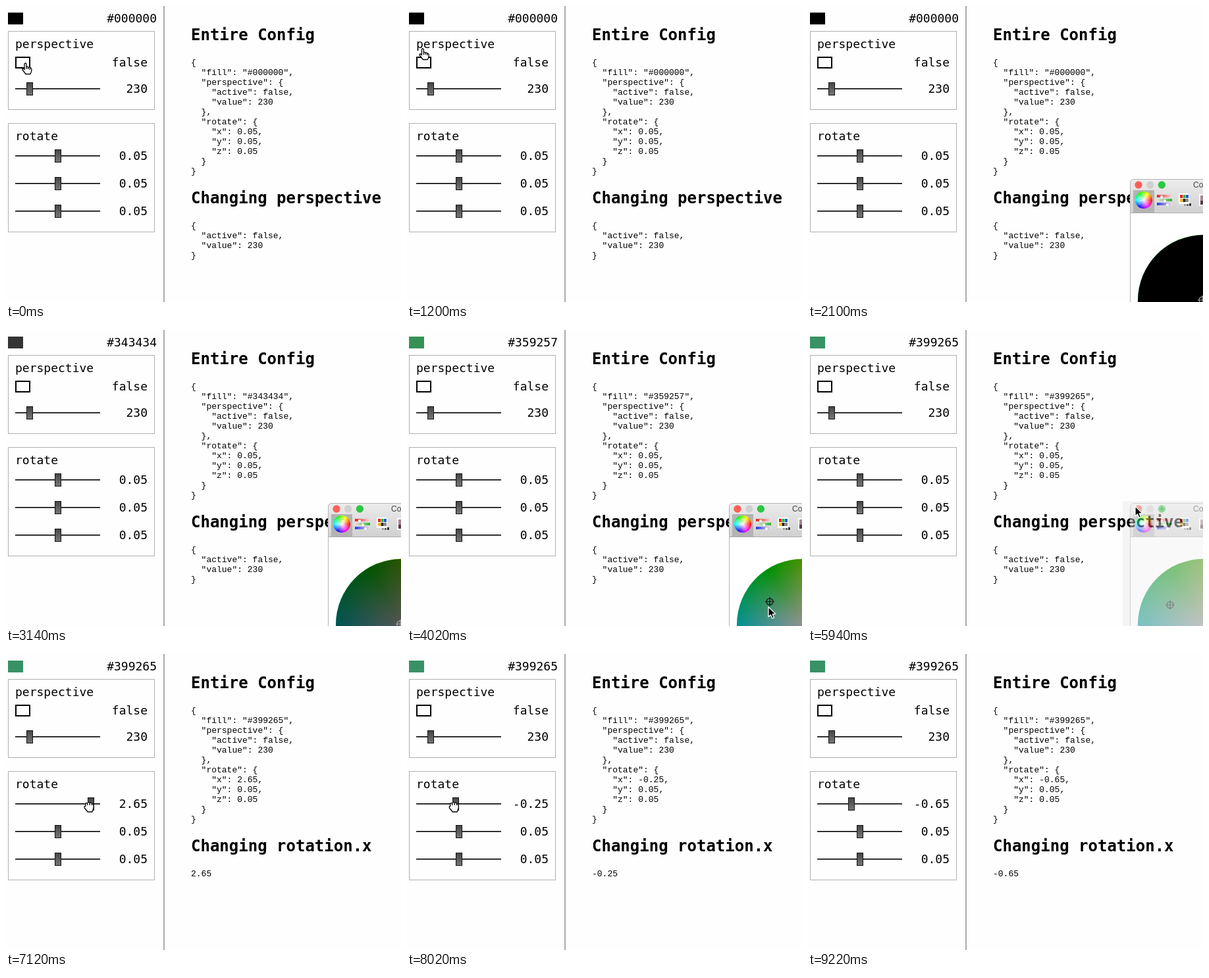
An HTML page with a canvas that plays this animation: 600x450 px, repeating every 9520 ms.

```html
<!DOCTYPE html>
<html lang="en">
<head>
<meta charset="utf-8">
<title>Config panel</title>
<style>
html, body { margin: 0; width: 100%; height: 100%; overflow: hidden; background: #fefefe; }
canvas { display: block; }
</style>
</head>
<body>
<canvas id="stage" width="600" height="450"></canvas>
<script>
const LOOP = 9520;
const LABEL = '18px "DejaVu Sans Mono", monospace';
const HEADING = 'bold 24px "DejaVu Sans Mono", monospace';
const CODE = '13px "Liberation Mono", monospace';
const TITLE = '12px "Liberation Sans", sans-serif';

const stage = document.getElementById('stage').getContext('2d');
const layer = document.createElement('canvas');
layer.width = 600;
layer.height = 450;
const popup = layer.getContext('2d');
let g = stage;

// Picker position and resulting fill, one entry per step from PICK_START
const PICK_START = 20;
const picks = [
  [599, 447, '#0d0d0d'], [599, 447, '#343434'], [599, 447, '#6e6e6e'], [599, 447, '#929292'],
  [599, 447, '#929292'], [585, 436, '#75927f'], [568, 424, '#56926b'], [551, 413, '#359257'],
  [541, 418, '#2f9265'], [540, 441, '#399287'], [556, 436, '#4d927f'], [572, 420, '#569264'],
  [560, 413, '#459260'], [550, 418, '#399265']
];

// rotate.x, one entry per step from SPIN_START
const SPIN_START = 44;
const spins = [.05, .35, 1.05, 1.95, 2.65, 2.05, .55, -1.25, -1.95, -1.05, -.25, -.55, -.65];

// Free cursor movement: step, x, y, shape
const moves = [
  [0, 24, 86, 'hand'], [7, 24, 86, 'hand'], [10, 7, 20, 'hand'], [12, 300, 230, 'arrow'],
  [13, 590, 440, 'arrow'], [14, 590, 440, ''], [34, 545, 375, 'arrow'], [35, 528, 318, 'arrow'],
  [36, 512, 288, 'arrow'], [37, 498, 269, 'arrow'], [38, 497, 268, 'arrow'], [40, 497, 268, 'arrow'],
  [41, 480, 262, 'arrow'], [42, 300, 245, 'arrow'], [43, 120, 230, 'arrow'], [57, 57, 224, 'hand'],
  [58, 70, 232, 'arrow'], [59, 200, 290, 'arrow'], [60, 400, 380, 'arrow'], [61, 544, 434, 'arrow'],
  [62, 544, 434, '']
];

const cursors = {
  arrow: { fill: '#000', line: '#fff', path: new Path2D('M0 0V15L3.5 12L6 17.5L8.6 16.4L6.3 11L10.8 10.6Z') },
  hand: { fill: '#fff', line: '#000', path: new Path2D(
    'M4 2Q5.5 -.5 7 2V7Q8.5 5 9.7 7.3Q11.5 6 12.3 8Q14.5 7.5 14.8 10V12Q14.5 14.5 13 17.5H6L1 11Q0 8.5 2.3 9L4 10.5Z' +
    'M7 7V10M9.7 7.3V10M12.3 8V11') },
  fist: { fill: '#fff', line: '#000', path: new Path2D(
    'M2 5Q2.5 1 5 3Q6.8 0 8.5 2.5Q11 1 11.8 3.6Q14 3 14.5 6V10L12.5 16H5.5L1 10.5Q-.5 7 2 7.5Z' +
    'M5 3V6M8.5 2.5V6M11.8 3.6V6') }
};

function rect(x, y, w, h, fill) {
  g.fillStyle = fill;
  g.fillRect(x, y, w, h);
}

function frame(x, y, w, h, color, width) {
  g.strokeStyle = color;
  g.lineWidth = width;
  g.strokeRect(x + width / 2, y + width / 2, w - width, h - width);
}

function text(string, x, y, font, align = 'left', fill = '#000') {
  g.font = font;
  g.textAlign = align;
  g.fillStyle = fill;
  g.fillText(string, x, y);
}

function disc(x, y, r, fill) {
  g.fillStyle = fill;
  g.beginPath();
  g.arc(x, y, r, 0, 2 * Math.PI);
  g.fill();
}

function stroke(path, color, width = 1) {
  g.strokeStyle = color;
  g.lineWidth = width;
  g.stroke(new Path2D(path));
}

function code(value, y) {
  JSON.stringify(value, null, 2).split('\n')
    .forEach((line, i) => text(line, 281, y + i * 15, CODE));
}

function slider(center, y, value) {
  rect(14, y - 1, 129, 1.6, '#000');
  const left = Math.round(center) - 5;
  const shade = g.createLinearGradient(0, y - 10, 0, y + 10);
  shade.addColorStop(0, '#444');
  shade.addColorStop(1, '#777');
  rect(left, y - 10, 10, 20, shade);
  frame(left, y - 10, 10, 20, '#111', 1);
  text(value, 215, y + 6, LABEL, 'right');
}

const angleToX = angle => 78.5 + angle * 18.9;

function hueWheel(x, y, r, brightness) {
  const hues = g.createConicGradient(0, x, y);
  for (let i = 0; i <= 6; i++) hues.addColorStop(i / 6, `hsl(${360 - i * 60}, 100%, 50%)`);
  const white = g.createRadialGradient(x, y, 0, x, y, r);
  white.addColorStop(0, '#fff');
  white.addColorStop(1, '#fff0');
  [hues, white, `rgba(0, 0, 0, ${1 - brightness})`].forEach(fill => disc(x, y, r, fill));
}

function toolbar() {
  rect(494, 280, 32, 34, '#b3b3b3');
  hueWheel(510, 295, 13, 1);
  ['#e8201c', '#25b92f', '#2438e8'].forEach((color, i) => {
    const y = 287 + i * 6;
    const fade = g.createLinearGradient(530, 0, 553, 0);
    fade.addColorStop(i === 1 ? 1 : 0, color);
    fade.addColorStop(i === 1 ? 0 : 1, '#f4dede');
    rect(530, y, 23, 4, fade);
    disc([537, 542, 546][i], y + 3, 2, '#fff');
  });
  rect(569, 290, 14, 15, '#ddd');
  for (let i = 0; i < 3; i++) rect(571 + i * 4, 300, 3, 4, ['#999', '#666', '#333'][i]);
  rect(563, 285, 16, 16, '#fff');
  ['#e22', '#2b3', '#25e', '#fb1', '#222', '#888'].forEach((color, i) =>
    rect(565 + i % 3 * 4.5, 287 + (i / 3 | 0) * 6, 4, 5, color));
  rect(594, 286, 20, 18, '#fff');
  rect(596, 288, 18, 14, '#a58499');
  rect(596, 296, 18, 6, '#5b3c46');
}

function colorWindow(step, pick) {
  g = popup;
  g.clearRect(0, 0, 600, 450);
  const bar = g.createLinearGradient(0, 264, 0, 315);
  bar.addColorStop(0, '#ececec');
  bar.addColorStop(1, '#d0d0d0');
  g.beginPath();
  g.roundRect(489.5, 263.5, 130, 200, 5);
  g.fillStyle = '#fff';
  g.fill();
  g.save();
  g.clip();
  rect(489, 263, 111, 51, bar);
  rect(489, 314, 111, 1, '#aaa');
  g.restore();
  g.strokeStyle = '#b4b4b4';
  g.lineWidth = 1;
  g.stroke();

  ['#fc6058', '#d0d0d0', '#2bc840'].forEach((color, i) => disc(502 + i * 17.7, 272, 5.7, color));
  if (step >= 37) stroke('M499.5 269.5l5 5m0-5l-5 5M534.4 272h6m-3-3v6', '#174d1c');
  text('Colors', 585, 276, TITLE, 'left', '#444');
  toolbar();

  const brightness = step < PICK_START ? 0 : [.1, .33, .48][step - PICK_START] || .57;
  hueWheel(601, 448, 100, brightness);
  const [x, y] = pick;
  stroke(`M${x - 5} ${y}a5 5 0 1 0 10 0a5 5 0 1 0-10 0M${x - 7} ${y}h14M${x} ${y - 7}v14`,
    brightness < .5 ? '#aaa' : '#111', 1.2);

  g = stage;
  const closing = step === 40;
  if (closing) rect(478, 260, 122, 190, 'rgba(0, 0, 0, .04)');
  g.globalAlpha = closing ? .5 : 1;
  g.drawImage(layer, 0, 0);
  g.globalAlpha = 1;
}

function cursorAt(step, pick, angle) {
  if (step >= 24 && step <= 33) return [pick[0] - 2, pick[1] + 8, 'arrow'];
  if (step >= SPIN_START && step <= 56) return [angleToX(angle) - 10, 224, 'fist'];
  const i = moves.findLastIndex(move => move[0] <= step);
  const [start, x, y, shape] = moves[i];
  const [end, nextX, nextY] = moves[i + 1] || [start + 1, x, y];
  const part = (step - start) / (end - start);
  return [x + (nextX - x) * part, y + (nextY - y) * part, shape];
}

function drawCursor([x, y, shape]) {
  if (!shape) return;
  const { fill, line, path } = cursors[shape];
  g.save();
  g.translate(x, y);
  g.lineJoin = 'round';
  g.strokeStyle = line;
  g.fillStyle = fill;
  g.lineWidth = 1.3;
  g.fill(path);
  g.stroke(path);
  g.restore();
}

function draw(step) {
  const pick = step < PICK_START ? [599, 447, '#000000']
    : picks[Math.min(step - PICK_START, picks.length - 1)];
  const angle = spins[Math.max(0, Math.min(step - SPIN_START, spins.length - 1))];
  const active = step >= 1 && step < 5;
  const fill = pick[2];
  const config = {
    fill,
    perspective: { active, value: 230 },
    rotate: { x: angle, y: .05, z: .05 }
  };

  rect(0, 0, 600, 450, '#fefefe');
  rect(239, 0, 2, 450, '#aaa');

  rect(3, 10, 23, 18, fill);
  text(fill, 229, 25, LABEL, 'right');

  frame(3, 38, 223, 120, '#b0b0b0', 1);
  text('perspective', 14, 64, LABEL);
  frame(14, 77, 23, 18, '#000', 2);
  if (active) rect(16, 79, 19, 14, '#000');
  text(active, 215, 92, LABEL, 'right');
  slider(36, 126, 230);

  frame(3, 178, 223, 166, '#b0b0b0', 1);
  text('rotate', 14, 204, LABEL);
  [angle, .05, .05].forEach((value, i) => slider(angleToX(value), 228 + i * 42, value));

  const rotating = step > SPIN_START;
  text('Entire Config', 281, 52, HEADING);
  code(config, 90);
  text(rotating ? 'Changing rotation.x' : 'Changing perspective', 281, 300, HEADING);
  code(rotating ? angle : config.perspective, 338);

  if (step >= 12 && step <= 40) colorWindow(step, pick);
  drawCursor(cursorAt(step, pick, angle));
}

function stepAt(t) {
  const steps = t < 2990 ? t / 149.5
    : t < 5940 ? 20 + (t - 2990) / 147.5
    : 40 + (t - 5940) / 149.17;
  return Math.floor(steps + .1);
}

const began = performance.now();
function tick() {
  draw(stepAt((performance.now() - began) % LOOP) % 64);
  requestAnimationFrame(tick);
}
tick();
</script>
</body>
</html>
```
